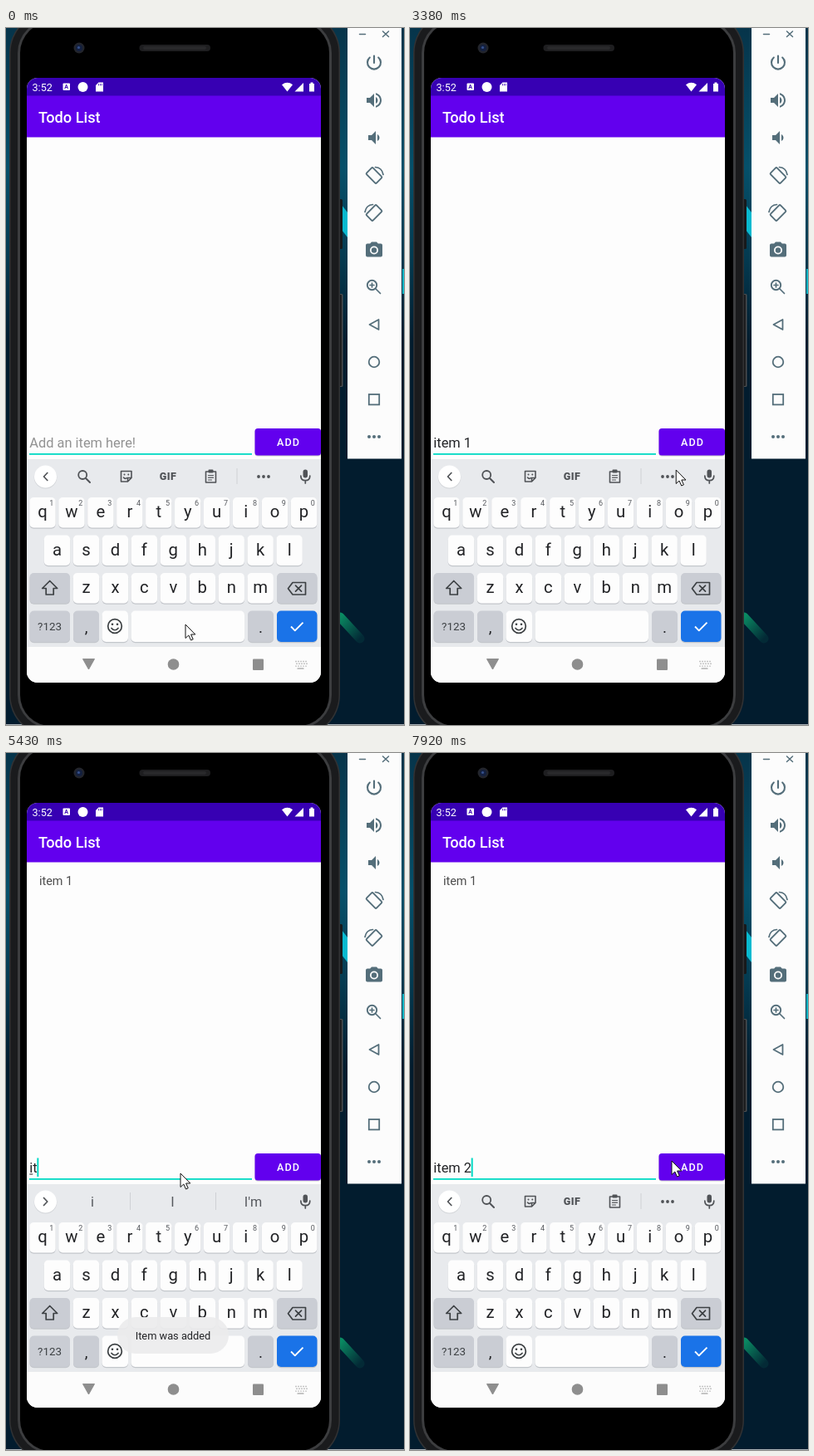
Write an HTML page that moves like this. It is 479 by 839 pixels and loops after 8 s.

```html
<!DOCTYPE html>
<html lang="en">
<head>
<meta charset="utf-8">
<title>Todo List</title>
<style>
  html, body { margin: 0; width: 100%; height: 100%; overflow: hidden; background: #021c2e; }
  svg { display: block; width: 100vw; height: 100vh; }
  text { font-family: Roboto, "Open Sans", sans-serif; white-space: pre; }
  .mid { text-anchor: middle; }
  .line { fill: none; stroke-linecap: round; stroke-linejoin: round; }
</style>
</head>
<body>
<svg id="stage" viewBox="0 0 479 839" preserveAspectRatio="none"></svg>
<script>
const LOOP = 8000;
const INK = '#222326', GREY = '#505357', SLATE = '#546e7a', TEAL = '#03dac5', PURPLE = '#6200ee';
const SIZE = 16.4;

const rect = (x, y, w, h, fill, r = 0, more = '') =>
  `<rect x="${x}" y="${y}" width="${w}" height="${h}" fill="${fill}" rx="${r}" ${more}/>`;
const circle = (x, y, r, fill, more = '') => `<circle cx="${x}" cy="${y}" r="${r}" fill="${fill}" ${more}/>`;
const text = (x, y, s, size, fill, more = '') =>
  `<text x="${x}" y="${y}" font-size="${size}" fill="${fill}" ${more}>${s}</text>`;
const mid = (x, y, s, size, fill, more = '') => text(x, y, s, size, fill, 'class="mid" ' + more);
const fillPath = (d, fill, more = '') => `<path d="${d}" fill="${fill}" ${more}/>`;
const line = (d, color, width = 2, more = '') =>
  `<path class="line" d="${d}" stroke="${color}" stroke-width="${width}" ${more}/>`;
const at = (x, y, body, more = '') => `<g transform="translate(${x} ${y}) ${more}">${body}</g>`;
const dots = (x, y, r, gap, fill) => [-gap, 0, gap].map(d => circle(x + d, y, r, fill)).join('');

function desktop() {
  return `<defs>
    <linearGradient id="sky" x2="0" y2="1">
      <stop offset="0" stop-color="#06344a"/><stop offset=".2" stop-color="#05506a"/>
      <stop offset=".33" stop-color="#043a50"/><stop offset=".45" stop-color="#021c2e"/>
    </linearGradient>
    <linearGradient id="streak" x2="1" y2="1">
      <stop offset="0" stop-color="#0a8a62"/><stop offset="1" stop-color="#032a36"/>
    </linearGradient>
    <clipPath id="screen">${rect(25, 60, 354, 728, '#fff', 13)}</clipPath>
  </defs>` +
    rect(0, 0, 479, 839, 'url(#sky)') +
    fillPath('M404 213l7 9v30l-7-9z', '#08b9cf') +
    rect(477, 290, 2, 30, '#09b4c4') +
    line('M402 709L426 735', 'url(#streak)', 11) +
    rect(0, 838, 479, 1, '#a9b0b5');
}

function phoneBody() {
  const ring = (inset, fill) =>
    rect(4 + inset, -20 + inset, 398 - 2 * inset, 873 - 2 * inset, fill, 50 - inset);
  return rect(400, 206, 5, 60, '#17191b', 1.5) + rect(400, 320, 5.5, 112, '#4a4c4e', 1.5) +
    rect(400, 321, 4, 110, '#1b1c1e', 1) +
    ring(0, '#313234') + ring(1.5, '#1a1b1d') + ring(10, '#3c3d3f') + ring(13, '#000') +
    circle(88, 24, 6.5, '#23252c') + circle(88, 24, 4, '#14203f') + circle(87.5, 23.5, 1.6, '#35508c') +
    rect(160.5, 20, 85.5, 8, '#1e1e20', 4) + rect(165, 22, 76, 4, '#29292b', 2);
}

function statusBar() {
  return rect(25, 60, 354, 22, '#3700b3') + rect(25, 81.5, 354, 50, PURPLE) +
    text(31.5, 75.5, '3:52', 12.6, '#fff') +
    rect(68.5, 66.5, 8.5, 8.5, '#fff', 1) + mid(72.7, 73.4, 'A', 7, '#3700b3', 'font-weight="700"') +
    circle(92.5, 71, 6, '#fff') +
    fillPath('M111.5 65.5h5.5v11h-9v-7.5z', '#fff') +
    line('M111.5 67.5v1.5M113.5 67.5v1.5M115.3 67.5v1.5', '#3700b3', .8) +
    fillPath('M332 68.2Q338.5 63.5 345 68.2L338.5 76.5z', '#fff') +
    fillPath('M358 66v10.5h-10.5z', '#fff') +
    fillPath('M365 67h1.5v-1.5h3V67h1.5v9.5h-6z', '#fff') +
    text(39, 113.7, 'Todo List', 18.2, '#fff', 'font-weight="500"');
}

function form() {
  return text(40, 159, 'item 1', 14.4, '#4c4c4c', 'id="row"') +
    rect(28, 512, 268, 1.8, TEAL) +
    text(28.3, 505, 'Add an item here!', SIZE, '#929292', 'id="hint"') +
    text(28.3, 505, '', SIZE, INK, 'id="typed"') +
    rect(28.3, 506.5, 0, 1, INK, 0, 'id="under"') +
    rect(28, 487.5, 2, 22.5, TEAL, 0, 'id="caret"') +
    rect(299.5, 483, 79.5, 32.5, '#aaa', 3.5, 'opacity=".6"') +
    rect(299.5, 482, 79.5, 32.5, PURPLE, 3.5) +
    mid(340, 503, 'ADD', 12.6, '#fff', 'font-weight="500" letter-spacing="1.12"') +
    rect(299.5, 482, 79.5, 32.5, '#fff', 3.5, 'id="ripple"');
}

function toolRow() {
  const tools =
    line('M49.8 535.5l-4.3 4.5 4.3 4.5', GREY, 1.7) +
    circle(92.2, 538, 5, 'none', `stroke="${GREY}" stroke-width="1.8"`) + line('M96 542l5 5', GREY, 2) +
    line('M138.5 533.5h12.5v8l-4.5 4.5h-8zM151 541.5h-4.5v4.5M141.5 541q2 2.5 4 .5', GREY, 1.6) +
    circle(142.5, 537.5, 1, GREY) + circle(147.3, 537.5, 1, GREY) +
    mid(195, 543.8, 'GIF', 12.5, GREY, 'font-weight="900" letter-spacing=".5"') +
    line('M240.5 534h12v13h-12z', GREY, 1.6) + rect(243.5, 531.5, 6, 4, GREY, 1) +
    line('M243.5 538.5h6M243.5 541.2h6M243.5 544h4', GREY, 1.2) +
    rect(277.5, 530, 1, 19, '#cfd1d5') + dots(310, 540, 1.9, 6, GREY);
  const words = line('M45.5 535.5l4.3 4.5-4.3 4.5', GREY, 1.7) +
    rect(149, 529, 1, 21, '#cfd1d5') + rect(252, 529, 1, 21, '#cfd1d5') +
    [104, 200.5, 297.5].map(x => mid(x, 546, '', 16.2, '#55585d', 'data-word')).join('');
  return circle(47.5, 540.8, 13.8, '#d2d4d8') + circle(47.5, 540, 13.5, '#fff') +
    `<g id="tools">${tools}</g><g id="words">${words}</g>` +
    rect(357.5, 531.5, 5.5, 10, GREY, 2.75) +
    line('M354.8 539q0 5.7 5.5 5.7t5.5-5.7M360.3 545v3', GREY, 1.7);
}

function keyboard() {
  const cap = (x, y, w, fill = '#fdfdfd', h = 36.5) =>
    rect(x, y + 1.2, w, h, '#c3c6cb', 5) + rect(x, y, w, h, fill, 5);
  const dark = '#cacdd4';
  const row = (letters, x, y) => [...letters].map((c, i) => {
    const cx = x + i * 34.95;
    return cap(cx - 15.7, y, 31.4) + mid(cx, y + 24, c, 20.3, INK);
  }).join('');
  const digits = [...'1234567890'].map((d, i) => mid(54.8 + i * 34.95, 575, d, 9, '#55585d')).join('');
  return rect(25, 519, 354, 226, '#e8eaed') + toolRow() +
    row('qwertyuiop', 44, 565) + digits + row('asdfghjkl', 61.5, 610.5) + row('zxcvbnm', 96.5, 656) +
    cap(28.5, 656, 48.5, dark) + cap(326, 656, 48.5, dark) +
    line('M52.7 665.5l9 9h-4.5v7.5h-9v-7.5h-4.5z', '#3c4043', 1.7) +
    line('M345 667.5h15.5v14.5H345l-5.5-7.25zM348.5 671.2l7 7M355.5 671.2l-7 7', '#3c4043', 1.7) +
    cap(28.5, 701.5, 48.5, dark, 37.5) + mid(52.5, 725, '?123', 13.4, '#3c4043') +
    cap(81, 701.5, 31, dark, 37.5) + mid(96.5, 728, ',', 19, INK) +
    cap(115.5, 701.5, 31.5, '#fdfdfd', 37.5) +
    circle(131, 720, 8.3, 'none', 'stroke="#3c4043" stroke-width="1.7"') +
    circle(128, 717.8, 1.3, '#3c4043') + circle(134, 717.8, 1.3, '#3c4043') +
    line('M127 722.5q4 4.5 8 0', '#3c4043', 1.7) +
    cap(150.5, 701.5, 136.5, '#fdfdfd', 37.5) +
    cap(291, 701.5, 31, dark, 37.5) + mid(306.5, 728, '.', 19, INK) +
    cap(326, 701.5, 48.5, '#1a73e8', 37.5) +
    line('M343 720.5l4.8 4.8 9.7-9.7', '#fff', 1.9, 'style="stroke-linecap:butt"');
}

function navBar() {
  const c = '#8e8e8e';
  return rect(25, 745, 354, 43, '#fcfcfc') +
    fillPath('M92.5 759.5h14l-7 12.5z', c, `stroke="${c}" stroke-linejoin="round"`) +
    circle(201.5, 766, 6.8, c) + rect(297, 759.5, 13, 13.5, c, 1) +
    [0, 1, 2].map(r => line(`M${348.5 + r % 2} ${762.5 + r * 2.8}h13`, c, 1.4,
      'stroke-dasharray="1 2" style="stroke-linecap:butt"')).join('') +
    line('M351 771h7', c, 1.2);
}

function sidePanel() {
  const speaker = 'M3 9v6h4l5 5V4L7 9H3zm13.5 3c0-1.77-1.02-3.29-2.5-4.03v8.05c1.48-.73 2.5-2.25 2.5-4.02z';
  const wave = 'M14 3.23v2.06c2.89.86 5 3.54 5 6.71s-2.11 5.85-5 6.71v2.06c4.01-.91 7-4.49 7-8.77s-2.99-7.86-7-8.77z';
  const camera = 'M9 2L7.17 4H4q-2 0-2 2v12q0 2 2 2h16q2 0 2-2V6q0-2-2-2h-3.17L15 2zM12 7a5 5 0 1 1 0 10a5 5 0 0 1 0-10z';
  const turn = rect(-5.5, -8.5, 11, 17, 'none', 1.5, `transform="rotate(-45)" stroke="${SLATE}" stroke-width="1.9"`) +
    line('M1.5 -10Q9.5 -9.5 11 -1', SLATE, 1.7);
  const icon = (y, d, x = 431) => at(x, y - 12, fillPath(d, SLATE));
  return rect(411, 0, 65, 518.5, '#fcfcfc') +
    line('M425.5 7.5h7M453.5 4l7 6.5M460.5 4l-7 6.5', SLATE, 1.5) +
    line('M443 33.5v8.5M437.8 35.5a8 8 0 1 0 10.4 0', SLATE, 2.1) +
    icon(87, speaker + wave) + icon(132, speaker, 433) +
    at(443, 177.5, turn) + at(443, 222.5, turn, 'scale(-1 1)') +
    icon(267.5, camera) + circle(443, 267.5, 3.2, SLATE) +
    circle(440.5, 309.5, 5.7, 'none', `stroke="${SLATE}" stroke-width="1.9"`) +
    line('M445 314l5.5 5.5M440.5 307v5M438 309.5h5', SLATE, 1.7) +
    line('M448.5 351v12l-11-6z', SLATE, 1.8) +
    circle(443, 402, 6.3, 'none', `stroke="${SLATE}" stroke-width="1.8"`) +
    rect(436.8, 441, 12.4, 12.4, 'none', 0, `stroke="${SLATE}" stroke-width="1.8"`) +
    dots(443, 492, 2, 6, SLATE);
}

const toast = `<g id="toast">${rect(134, 679, 134, 44, '#ebebed', 22, 'opacity=".9"')}` +
  mid(201, 706, 'Item was added', 12.8, INK) + '</g>';
const pointer = '<path id="pointer" d="M0 0V16.5L3.8 13L6.5 19L9.2 17.8L6.6 12H11.8z" ' +
  'fill="#fff" stroke="#111" stroke-width="1" stroke-linejoin="round"/>';

document.getElementById('stage').innerHTML = desktop() + phoneBody() +
  `<g clip-path="url(#screen)">${rect(25, 60, 354, 728, '#fdfdfd')}${statusBar()}${form()}` +
  `${keyboard()}${navBar()}${toast}</g>` + sidePanel() + pointer;

const el = id => document.getElementById(id);
const slots = document.querySelectorAll('[data-word]');
const pen = document.createElement('canvas').getContext('2d');
const widthOf = s => {
  pen.font = SIZE + 'px Roboto, "Open Sans", sans-serif';
  return pen.measureText(s).width;
};

const WORDS = {
  i: ['i', 'I', "I'm"],
  it: ['it', "it's", 'if'],
  ite: ['ite', 'item', "it's"],
  item: ['item', 'items', 'itemized'],
  next: ['is', 'in', 'that']
};

// time, text, underlined letters, suggestions (none: tool icons)
const TYPING = [
  [0, '', 0], [1170, 'i', 0], [1300, 'it', 1, 'i'], [1440, 'ite', 2, 'it'], [1590, 'item', 3, 'ite'],
  [1710, 'item', 4, 'item'], [2110, 'item ', 0, 'item'], [2260, 'item ', 0, 'next'], [2540, 'item 1', 0],
  [3680, '', 0], [5300, 'i', 0], [5430, 'it', 1, 'i'], [5580, 'it', 2, 'it'], [6420, 'ite', 2, 'it'],
  [6540, 'item', 3, 'ite'], [6680, 'item ', 0, 'item'], [6840, 'item 2', 0, 'next'], [7090, 'item 2', 0]
];
const BLINKS = [120, 550, 1050, 3110, 3530, 4210, 4790, 5160, 5300, 6000, 6280, 7370, 7870];
const RIPPLE = [[0, 0], [3680, .12], [3800, .22], [3950, .13], [4090, 0]];
const TOAST = [[0, 0], [3800, .2], [3950, .8], [4090, 1], [5850, .6], [6000, .2], [6140, 0]];
const PATH = [
  [0, 216, 718], [2550, 216, 718], [3530, 346, 486], [3670, 340.5, 496], [3950, 340.5, 496],
  [4510, 210, 506], [7590, 210, 506], [7870, 315, 491], [LOOP, 315, 491]
];

const last = (list, t) => list.filter(e => e[0] <= t).pop();

// The pointer is sampled every 140 ms.
function pointerAt(t) {
  const s = Math.max(0, 2690 + 140 * Math.floor((t - 2690) / 140));
  const n = PATH.findIndex(p => p[0] > s);
  const [a, b] = [PATH[n - 1], PATH[n]];
  const u = (s - a[0]) / (b[0] - a[0]), k = u * u * (3 - 2 * u);
  return [1, 2].map(i => a[i] + (b[i] - a[i]) * k);
}

function draw(t) {
  const [, typed, marked, set] = last(TYPING, t);
  el('typed').textContent = typed;
  el('hint').style.display = typed ? 'none' : '';
  el('under').setAttribute('width', widthOf(typed.slice(0, marked)));
  el('caret').setAttribute('x', 28 + widthOf(typed));
  el('caret').style.opacity = BLINKS.filter(b => b <= t).length % 2;
  el('tools').style.display = set ? 'none' : '';
  el('words').style.display = set ? '' : 'none';
  if (set) slots.forEach((s, i) => { s.textContent = WORDS[set][i]; });
  el('row').style.display = t < 3680 ? 'none' : '';
  el('ripple').style.opacity = last(RIPPLE, t)[1];
  el('toast').style.opacity = last(TOAST, t)[1];
  el('pointer').setAttribute('transform', `translate(${pointerAt(t)})`);
}

const start = performance.now();
function frame() {
  draw((performance.now() - start) % LOOP);
  requestAnimationFrame(frame);
}
frame();
</script>
</body>
</html>
```
